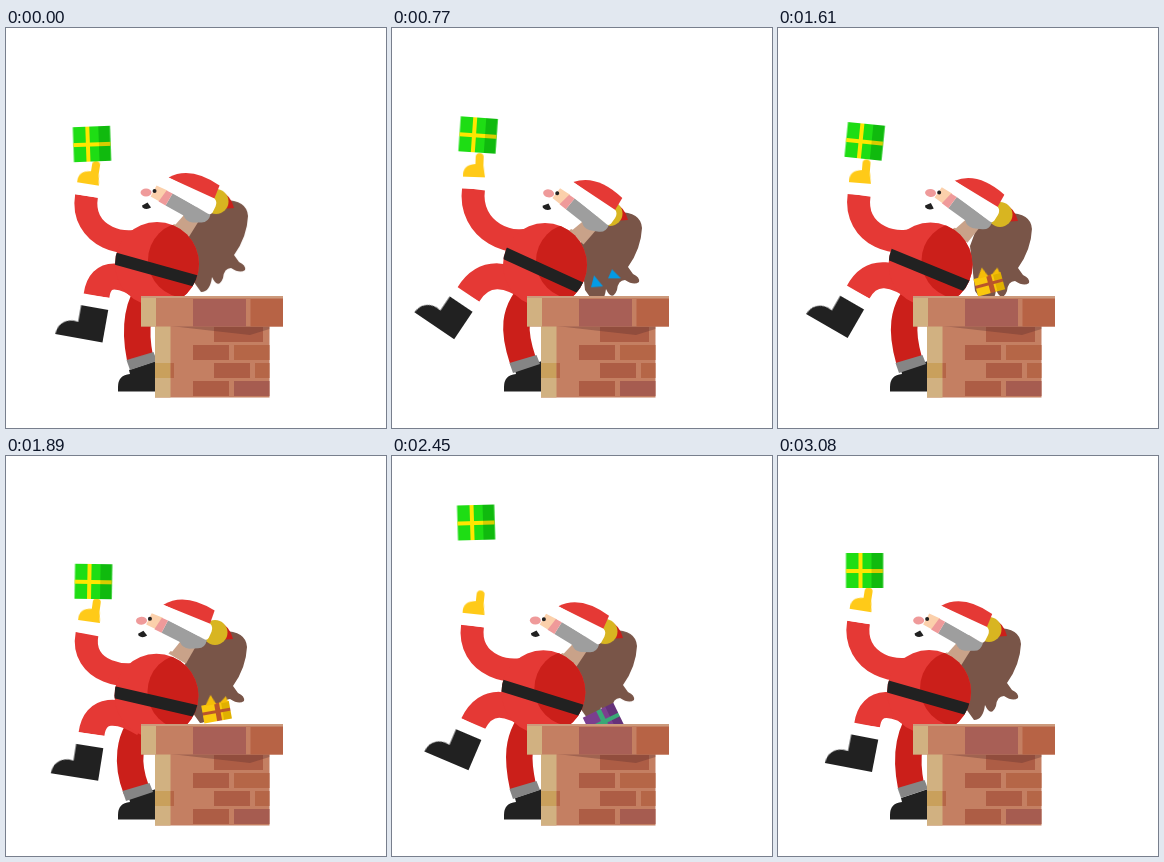
Animation of 380x400 px, one loop 3150 ms. Source, as an HTML page without scripts:

```html
<!DOCTYPE html>
<html lang="en">
<head>
<meta charset="utf-8">
<title>Santa at the chimney</title>
<style>
@property --lean { syntax: "<number>"; inherits: true; initial-value: 0; }
@property --dip { syntax: "<number>"; inherits: true; initial-value: 0; }
html, body { margin: 0; width: 100%; height: 100%; overflow: hidden; background: #fff; }
svg { display: block; width: 380px; height: 400px; animation: lean 3150ms linear infinite; }
.move { animation: 3150ms linear infinite; }
.red { fill: #e53935; }
.dark { fill: #cb1f1a; }
.black { fill: #212121; }
.limb { fill: none; stroke: #e53935; }

.head { transform-origin: 143px 271px; transform: translate(-.5px, -.5px) rotate(calc(var(--lean) * 9deg)); }
.body { transform: translate(calc(var(--lean) * 2px), calc(var(--lean) * 1px + var(--dip) * 1px)); }
.belt { transform-origin: 151px 236px; transform: rotate(calc(15.5deg + var(--lean) * 9deg)); }
@keyframes lean {
  0%, 100% { --lean: 0; --dip: 0; }
  8.89% { --lean: .75; --dip: 0; }
  18.89% { --lean: 1.08; --dip: 0; }
  24.44% { --lean: 1; --dip: 0; }
  42.22% { --lean: .77; --dip: -1; }
  53.33% { --lean: .75; --dip: 0; }
  60% { --lean: -.27; --dip: 4; }
  71% { --lean: -.35; --dip: 5; }
  77.78% { --lean: .2; --dip: 0; }
  82.86%, 91.11% { --lean: .3; --dip: 0; }
  97.78% { --lean: .04; --dip: 0; }
}

.sack { animation-name: sack; }
@keyframes sack {
  0%, 100% { transform: translate(0, 0); }
  8.89% { transform: translate(6px, 9px); }
  18.89% { transform: translate(9px, 12px); }
  24.44% { transform: translate(8px, 12px); }
  42.22% { transform: translate(9px, 12px); }
  51% { transform: translate(12px, 13px); }
  53.33% { transform: translate(11px, 12px); }
  60% { transform: translate(-1px, 3px); }
  71% { transform: translate(-1px, 2px); }
  77.78% { transform: translate(3px, 2px); }
  91.11% { transform: translate(2px, 4px); }
  97.78% { transform: translate(1px, 0); }
}

.thigh { animation-name: thigh; }
@keyframes thigh {
  0%, 100% { d: path("M140 262C118 246 94 240 90.5 268"); }
  8.89%, 77.78%, 91.11% { d: path("M140 262C118 247 95 240 81 268"); }
  18.89% { d: path("M140 262C118 247 91 238 74 266"); }
  24.44% { d: path("M140 262C118 247 93 239 76 267"); }
  42.22%, 53.33% { d: path("M140 262C118 246 94 238 80 264.5"); }
  60%, 71% { d: path("M138 268C112 252 89 251 85.5 278"); }
  97.78% { d: path("M140 262C118 246 93 241 89 269.5"); }
}

.boot { animation-name: boot; }
@keyframes boot {
  0%, 100% { transform: translate(88.5px, 279.5px) rotate(10deg); }
  8.89% { transform: translate(74.5px, 280px) rotate(25deg); }
  18.89% { transform: translate(66.5px, 275px) rotate(36deg); }
  24.44% { transform: translate(69px, 276px) rotate(34deg); }
  42.22%, 53.33% { transform: translate(74px, 274.5px) rotate(30deg); }
  60%, 71% { transform: translate(83.5px, 290px) rotate(9deg); }
  77.78% { transform: translate(76.5px, 278.5px) rotate(23deg); }
  82.86%, 91.11% { transform: translate(75px, 278px) rotate(24deg); }
  97.78% { transform: translate(86.5px, 281px) rotate(11deg); }
}

.shin { animation-name: shin; }
@keyframes shin {
  0%, 100% { d: path("M146 258C128 280 130 310 134 330"); }
  8.89%, 77.78%, 91.11% { d: path("M146 258C122 280 126 308 131 331"); }
  18.89%, 24.44% { d: path("M146 258C118 282 122 306 131 333"); }
  42.22%, 53.33% { d: path("M146 258C121 281 124 307 131 332"); }
  60%, 71% { d: path("M146 258C118 280 122 312 130 333"); }
  97.78% { d: path("M146 258C127 280 129 310 133 330"); }
}

.ankle { animation-name: ankle; }
@keyframes ankle {
  0%, 100% { transform: translate(0, 0); }
  8.89%, 77.78%, 91.11% { transform: translate(-3px, 1px); }
  18.89%, 24.44%, 42.22%, 53.33% { transform: translate(-3px, 3px); }
  60%, 71% { transform: translate(-4px, 3px); }
  97.78% { transform: translate(-1px, 0); }
}

.arm { animation-name: arm; }
@keyframes arm {
  0%, 100% { d: path("M150 206C120 225 74 208 80.5 168"); }
  8.89% { d: path("M150 207C120 224 76 202 81 161"); }
  18.89% { d: path("M150 207C120 223 76 199 81 156.5"); }
  24.44% { d: path("M150 207C120 224 76 202 81.5 161"); }
  42.22% { d: path("M150 206C120 224 76 203 81.5 163"); }
  53.33% { d: path("M150 206C120 225 75 208 81 168"); }
  60% { d: path("M150 212C120 228 74 215 81 178"); }
  66.67% { d: path("M150 212C120 229 74 217 81 182"); }
  73.33% { d: path("M150 212C120 227 74 214 81 177"); }
  77.78% { d: path("M150 206C120 225 75 209 80.5 170"); }
  91.11% { d: path("M150 206C120 223 76 199 81 157"); }
  97.78% { d: path("M150 206C120 225 74 207 80.5 166.5"); }
}

.hand { animation-name: hand; }
@keyframes hand {
  0%, 100% { transform: translate(82px, 156px) rotate(9deg); }
  8.89% { transform: translate(82px, 149px) rotate(5deg); }
  18.89% { transform: translate(82px, 144.5px) rotate(3deg); }
  24.44% { transform: translate(82px, 149px) rotate(2deg); }
  42.22% { transform: translate(81.5px, 151px) rotate(3deg); }
  53.33% { transform: translate(82px, 156px) rotate(5deg); }
  60% { transform: translate(83px, 165.5px) rotate(8deg); }
  66.67% { transform: translate(83px, 170px) rotate(8deg); }
  73.33% { transform: translate(82.5px, 165px) rotate(7deg); }
  77.78% { transform: translate(81.5px, 158px) rotate(6deg); }
  91.11% { transform: translate(82px, 145px) rotate(5deg); }
  97.78% { transform: translate(82.5px, 154.5px) rotate(9deg); }
}

.gift { animation-name: gift; }
@keyframes gift {
  0%, 100% { transform: translate(86.5px, 133.5px) rotate(-2deg); }
  8.89% { transform: translate(85px, 125px) rotate(0deg); }
  18.89% { transform: translate(86px, 119px) rotate(3deg); }
  24.44% { transform: translate(84.8px, 124.5px) rotate(4deg); }
  42.22% { transform: translate(84.3px, 127.5px) rotate(9deg); }
  53.33% { transform: translate(85px, 131.5px) rotate(5deg); }
  60% { transform: translate(87px, 143px) rotate(1deg); }
  66.67% { transform: translate(87px, 147px) rotate(0deg); }
  73.33% { transform: translate(86px, 142px) rotate(-1deg); animation-timing-function: cubic-bezier(.33, .67, .67, 1); }
  82.86% { transform: translate(84px, 61.5px) rotate(-2deg); animation-timing-function: cubic-bezier(.33, 0, .67, .33); }
  91.11% { transform: translate(86px, 119.5px) rotate(-1deg); }
  97.78% { transform: translate(86.5px, 132px) rotate(0deg); }
}

/* presents slipping from the sack into the chimney */
.blue { animation-name: blue; }
@keyframes blue {
  0%, 20% { transform: translate(213px, 246px); visibility: hidden; }
  20.1% { transform: translate(213px, 246px); visibility: visible; }
  24.44% { transform: translate(214px, 254px); visibility: visible; }
  29%, 100% { transform: translate(215px, 296px); visibility: hidden; }
}
.yellow { animation-name: yellow; }
@keyframes yellow {
  0%, 39.9% { transform: translate(208px, 244px) rotate(-16deg); visibility: hidden; }
  40% { transform: translate(208px, 244px) rotate(-16deg); visibility: visible; }
  42.22% { transform: translate(209px, 248px) rotate(-20deg); visibility: visible; }
  60% { transform: translate(209px, 247px) rotate(-10deg); visibility: visible; }
  66.67%, 100% { transform: translate(212px, 300px) rotate(-20deg); visibility: hidden; }
}
.purple { animation-name: purple; }
@keyframes purple {
  0%, 73.2% { transform: translate(206px, 243px) rotate(-20deg); visibility: hidden; }
  73.3% { transform: translate(206px, 243px) rotate(-20deg); visibility: visible; }
  77.78% { transform: translate(206px, 254px) rotate(-26deg); visibility: visible; }
  82.5%, 100% { transform: translate(209px, 300px) rotate(-32deg); visibility: hidden; }
}
</style>
</head>
<body>
<svg viewBox="0 0 380 400">
  <defs>
    <clipPath id="belly"><circle cx="151" cy="236" r="42"/></clipPath>
  </defs>

  <g class="move sack">
    <path fill="#795548" d="M180 205L190 178L215 172Q241 171 242 188Q241 209 228 227L233 234Q240 237 239 242Q234 246 225 240Q218 240 217 250Q212 262 206 249Q204 264 195 264L185 250Z"/>
    <path class="dark" d="M213 162Q225 167 228 180L213 181Z"/>
    <circle cx="210" cy="173.500" r="12.500" fill="#d8b521"/>
  </g>

  <path class="move blue" fill="#039be5" d="M-15 5L-12-7L-3 4ZM2-4L6-13L15-4Z"/>
  <g class="move yellow">
    <path fill="#f9c80e" d="M-14 0H14V18H-14Z"/>
    <path fill="#e0b000" d="M6 0H14V18H6Z"/>
    <path fill="#b9552b" d="M-1 0H4V18H-1ZM-14 7H14V10H-14Z"/>
    <path fill="#f5bd08" d="M-10 1L-3-9L1 1ZM4 1L12-5L13 1Z"/>
  </g>
  <g class="move purple">
    <path fill="#7b3f8e" d="M-17 0H17V26H-17Z"/>
    <path fill="#65327a" d="M8 0H17V26H8Z"/>
    <path fill="#3aa876" d="M-2 0H3V26H-2ZM-17 11H17V15H-17Z"/>
  </g>

  <path class="limb move shin" style="stroke:#cb1f1a" stroke-width="26.500" d="M146 258C128 280 130 310 134 330"/>
  <path class="black" d="M123 342L150 333V363.500H112V359Q112 347 124 346Z"/>
  <path class="move ankle" fill="#858585" d="M120.500 332L147.500 324L151 333L124 342Z"/>

  <g class="head">
    <path fill="#c9a289" d="M166 199L178 187L193 194L183 210Z"/>
    <path fill="#fff" d="M146 169L161 177L178 188L170 197L150 192L138 180Z"/>
    <path fill="#9e9e9e" d="M167 166L205 187Q203 195 196 195H187Q180 194 178 188L160 178Z"/>
    <path fill="#fbd0ab" d="M151 158L162 163L154 174L145 169Z"/>
    <path fill="#ef9a9a" d="M161 163L167 166L160 178L153 174Z"/>
    <ellipse cx="140.500" cy="165" rx="5.500" ry="4" fill="#ef9a9a"/>
    <circle class="black" cx="149" cy="163.500" r="2"/>
    <path class="black" d="M136.500 178L142 175L145.500 180Q141 183 137 180Z"/>
    <path class="red" d="M163 150Q185 138 214 158L208 173Z"/>
    <path fill="#fff" d="M163 150L209 171Q212 174 210 179L207 185Q205 188 202 186L158 160Q156 157 158 154Q160 150 163 150Z"/>
  </g>

  <path class="limb move thigh" stroke-width="26" d="M140 262C118 246 94 240 90.500 268"/>
  <g class="move boot">
    <path fill="#fff" d="M-14-12H14V1H-14Z"/>
    <path class="black" d="M-13.500 0H14V33H-34Q-33 18-18 16.500L-13.500 17Z"/>
  </g>

  <path class="limb move arm" stroke-width="23" d="M150 206C120 225 74 208 80.500 168"/>
  <g class="body">
    <circle class="red" cx="151" cy="236" r="42"/>
    <g clip-path="url(#belly)">
      <circle class="dark" cx="180" cy="232" r="38"/>
      <path class="black belt" d="M100 236H202V248H100Z"/>
    </g>
  </g>

  <g class="move hand">
    <path fill="#fff" d="M-12-1H12V12H-12Z"/>
    <path fill="#ffca18" d="M-11 0Q-12-12 1-13V-20A4 4 0 0 1 9-20V-12L11 0Z"/>
  </g>
  <g class="move gift">
    <path fill="#1edd14" d="M-18.500-35H18.500V0H-18.500Z"/>
    <path fill="#10ba0e" d="M7-35H18.500V0H7Z"/>
    <path fill="#ffe600" d="M-6-35H-2V0H-6ZM-18.500-19H7V-15H-18.500Z"/>
    <path fill="#d8cc00" d="M7-19H18.500V-15H7Z"/>
  </g>

  <g class="chimney">
    <path fill="#c47f62" d="M149 298H263.500V369.500H149Z"/>
    <path fill="#d1b181" d="M149 298H164.500V369.500H149Z"/>
    <path fill="#c9a05c" d="M149 335H164.500V350H149Z"/>
    <path fill="#b56647" d="M164.500 335H168V350H164.500ZM228 317H263.500V332H228ZM249 335H263.500V350H249Z"/>
    <path fill="#ad5d45" d="M208 299H257V314H208ZM187 317H223V332H187ZM208 335H244V350H208ZM187 353H223V368H187Z"/>
    <path fill="#a65c50" d="M228 353H263.500V368H228Z"/>
    <path fill="#5d2f2f" opacity=".35" d="M164.500 298H263.500V301L244 307L208 303Z"/>
    <path fill="#c47f62" d="M135 268H277V298.500H135Z"/>
    <path fill="#d1b181" d="M135 268H150V298.500H135Z"/>
    <path fill="#a85f56" d="M187 271H240V298.500H187Z"/>
    <path fill="#b76345" d="M244.500 271H277V298.500H244.500Z"/>
    <path fill="#cc9a7c" d="M135 268H277V270H135Z"/>
  </g>
</svg>
</body>
</html>
```
